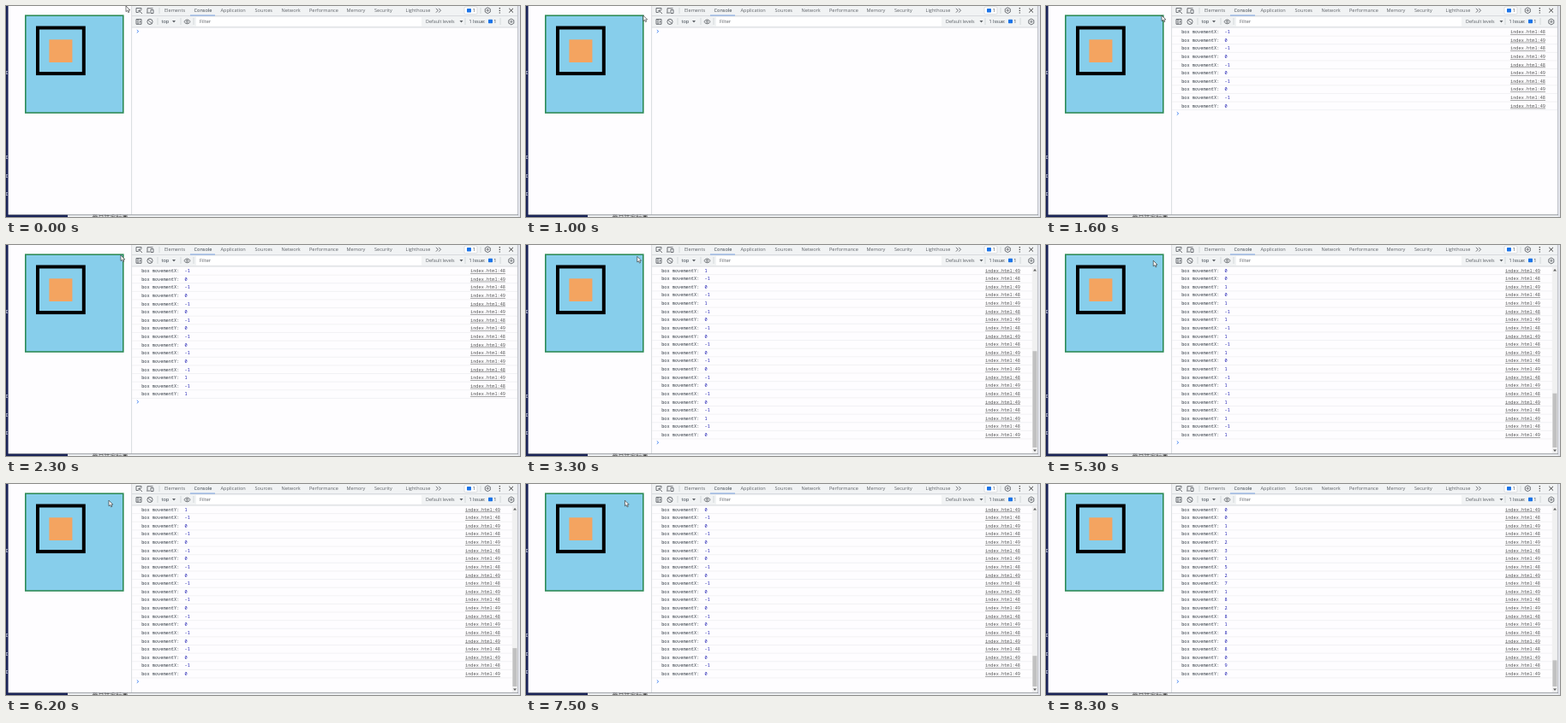
Animation of 600 by 247 pixels, one loop 8.9 s. Source, as an HTML page:

```html
<!DOCTYPE html>
<html lang="en">
<head>
<meta charset="utf-8">
<title>Mouse movement log</title>
<style>
  html, body { margin: 0; width: 100%; height: 100%; overflow: hidden; background: #fff; }
  svg { display: block; width: 600px; height: 247px; }
  text { font: 5.6px "Open Sans", "Noto Sans", sans-serif; fill: #5f6368; white-space: pre; }
  .dark { fill: #303942; }
  .small { font-size: 5.4px; }
  #log text { font: 5.25px "Noto Sans Mono", monospace; fill: #303942; }
  #log .num { fill: #1c1cb0; }
  #log .link { fill: #555; text-decoration: underline; text-anchor: end; }
  .icon { fill: none; stroke: #5f6368; stroke-width: .9; }
  .line { stroke: #cfd2d6; stroke-width: .8; }
</style>
</head>
<body>
<svg viewBox="0 0 600 247">
  <!-- desktop behind the window -->
  <rect width="600" height="247" fill="#1a2458"/>
  <rect x="72" y="240" width="528" height="7" fill="#eceef0"/>
  <text x="100.5" y="247.6" style="font:7px 'Noto Sans CJK SC','Noto Sans CJK',sans-serif;fill:#333">每日任务结果</text>
  <g id="marks"></g>

  <rect x="2.6" width="597.4" height="244" fill="#fefdff"/>
  <rect x="22.8" y="11.2" width="114" height="113.8" fill="#87ceeb" stroke="#2e8b57" stroke-width="1.6"/>
  <rect x="37" y="25.5" width="53.8" height="53.6" fill="none" stroke="#000" stroke-width="4"/>
  <rect x="50.4" y="39.3" width="27" height="26.7" fill="#f4a460"/>

  <rect x="147" width="450" height="25" fill="#f1f3f4"/>
  <rect x="222" y="13.2" width="263" height="10.4" fill="#fff"/>
  <path class="line" d="M146.6 0V244M147 11.6H597M147 25H597M179 2V9M177 14V22M204 14V22M219 14V22M536 14V22M577 14V22M554 2V9"/>
  <path d="M215 11H244" stroke="#5b8fdc" stroke-width=".8"/>
  <g id="tabs"></g>
  <text x="181.5" y="20.2" class="dark">top</text>
  <path d="M194 17l4 0l-2 2.6zM529.5 17l4 0l-2 2.6z" fill="#5f6368"/>
  <text x="226" y="20.2">Filter</text>
  <text x="490" y="20.2" class="small">Default levels</text>
  <text x="540.5" y="20.2" class="dark small">1 Issue:</text>
  <rect x="563" y="15.8" width="5" height="4.4" rx=".6" fill="#1a73e8"/>
  <text x="569.3" y="20.2" class="dark">1</text>
  <rect x="535" y="1" width="15" height="8.6" rx="1.5" fill="#fff" stroke="#cfd2d6" stroke-width=".7"/>
  <rect x="538" y="3" width="5" height="4.4" rx=".6" fill="#1a73e8"/>
  <text x="544.7" y="7.4" class="dark">1</text>
  <g class="icon">
    <path d="M154 7.5H152V2.5H158V4.5M155 5l4 4M155 8V5H158"/>
    <path d="M165 7.5V2.7H171.5M164 8H168M169 4.5H172V8.5H169z"/>
    <path d="M152 15.5H158V21.3H152zM154 15.5V21.3M155.5 17.2l1.7 1.2l-1.7 1.2"/>
    <path d="M165.8 16.2l4.4 4.4"/><circle cx="168" cy="18.4" r="3.1"/>
    <path d="M207.8 18.4Q211.5 13.6 215.2 18.4Q211.5 23.2 207.8 18.4z"/><circle cx="211.5" cy="18.4" r="1"/>
    <path d="M502 2.8l2.3 2.4l-2.3 2.4M505.2 2.8l2.3 2.4l-2.3 2.4"/>
    <path d="M587.2 2.8l4.8 4.8M592 2.8l-4.8 4.8" stroke="#333"/>
    <path d="M576.3 2V3.2M576.3 4.7V5.9M576.3 7.4V8.6" stroke="#333" stroke-width="1.2"/>
    <g id="gear"><path d="M562.3 1.8l3 1.7v3.5l-3 1.7l-3-1.7v-3.5z"/><circle cx="562.3" cy="5.2" r="1"/></g>
    <use href="#gear" x="27.5" y="13.2"/>
  </g>

  <g id="log"></g>

  <rect x="597.4" width="2.6" height="247" fill="#e3e5ec"/>
  <path d="M597.4 0V245" stroke="#a9acb5" stroke-width=".7"/>
  <path d="M2.6 244.4H598" stroke="#8b8e96" stroke-width=".8"/>
  <path id="cursor" d="M0 0V6.6L1.6 5.3L2.7 7.7L3.8 7.2L2.8 4.9H4.8z" fill="#fff" stroke="#222" stroke-width=".6"/>
</svg>
<script>
const $ = id => document.getElementById(id);
const LOOP = 8900, STEP = 100, PITCH = 9.62, VISIBLE = 21;
const EXIT = 65, EXIT_TIME = 8300;

const tabs = { Elements: 185, Console: 219.5, Application: 250.5, Sources: 290.5, Network: 321.5,
  Performance: 354, Memory: 397.5, Security: 430, Lighthouse: 466.5 };
$("tabs").innerHTML = Object.entries(tabs).map(([name, x]) =>
  `<text x="${x}" y="7.4"${name === "Console" ? ' class="dark"' : ""}>${name}</text>`).join("");
$("marks").innerHTML = [78, 177, 199, 220].map(y =>
  `<path d="M0 ${y - 1.5}H2M0 ${y + 1.5}H2M.7 ${y - 1.5}v3" stroke="#c5cbe0" stroke-width=".7"/>`).join("");

// Event deltas: a slow drift left, a dip downwards, then an accelerating exit to the right
const nudges = [6, 7, 9, 11, 18, 40], rests = [26, 27, 31];
function moveX(i) {
  const k = i - EXIT;
  if (k >= 0) return Math.round(k + 3 * Math.sin(Math.PI * k / 9) ** 2);
  return rests.includes(i) ? 0 : -1;
}
function moveY(i) {
  const k = i - EXIT;
  if (k >= 0) return k < 7 ? 1 + k % 2 : 0;
  return +(i > 25 && i < 37 || nudges.includes(i));
}

// Bursts of movement: start, end, events, acceleration
const bursts = [[1100, 1800, 7, 1], [2200, 3500, 15, 1], [3700, 4700, 11, 1], [5000, 6700, 30, 1.4], [7400, EXIT_TIME, 12, 1]];
const ramp = (t, from, to) => Math.min(1, Math.max(0, (t - from) / (to - from)));
const eventCount = t => Math.round(bursts.reduce((sum, [from, to, n, power]) => sum + n * ramp(t, from, to) ** power, 0));

function logRow(index, y, right) {
  const n = index >> 1, isY = index & 1;
  return `<text x="158.2" y="${y + 1.8}">box movement${isY ? "Y" : "X"}:  ` +
    `<tspan class="num">${isY ? moveY(n) : moveX(n)}</tspan></text>` +
    `<text class="link" x="${right - 14}" y="${y + 1.8}">index.html:${48 + isY}</text>` +
    `<path d="M147 ${y + 4.8}H${right}" stroke="#ececef" stroke-width=".7"/>`;
}

function scrollbar(rows) {
  const top = 33, bottom = 237, height = (bottom - top) * 218 / ((rows + 1) * PITCH);
  return `<rect x="590.8" y="25.4" width="6.4" height="219" fill="#f1f1f1"/>
    <rect x="591.4" y="${bottom - height}" width="5" height="${height}" fill="#c1c1c1"/>
    <path d="M592 30.5h4l-2-2.4zM592 239.5h4l-2 2.4z" fill="#606060"/>`;
}

function drawLog(count) {
  const rows = count * 2, scrolled = rows > VISIBLE;
  const shown = Math.min(rows, VISIBLE), top = scrolled ? 29.8 : 30.3, right = scrolled ? 591 : 597;
  let out = "";
  for (let i = 0; i < shown; i++) out += logRow(rows - shown + i, top + i * PITCH, right);
  const y = top + shown * PITCH - .6;
  out += `<path d="M152.8 ${y - 1.7}l1.9 1.7l-1.9 1.7" fill="none" stroke="#367cf1" stroke-width=".9"/>`;
  $("log").innerHTML = out + (scrolled ? scrollbar(rows) : "");
}

// The pointer enters from the top, then follows the logged deltas
function drawCursor(t, count) {
  const enter = ramp(t, 0, 1000);
  let x = 140 - 3.2 * enter, y = 11 * enter;
  for (let i = 0; i < count; i++) {
    x += .35 * moveX(i);
    y += .48 * moveY(i);
  }
  $("cursor").setAttribute("transform", `translate(${x} ${y})`);
  $("cursor").setAttribute("visibility", t < EXIT_TIME ? "visible" : "hidden");
}

let drawn = -1;
function frame(now) {
  const t = Math.floor(now % LOOP / STEP) * STEP;
  if (t !== drawn) {
    drawn = t;
    const count = eventCount(t);
    drawLog(count);
    drawCursor(t, count);
  }
  requestAnimationFrame(frame);
}
frame(0);
</script>
</body>
</html>
```
